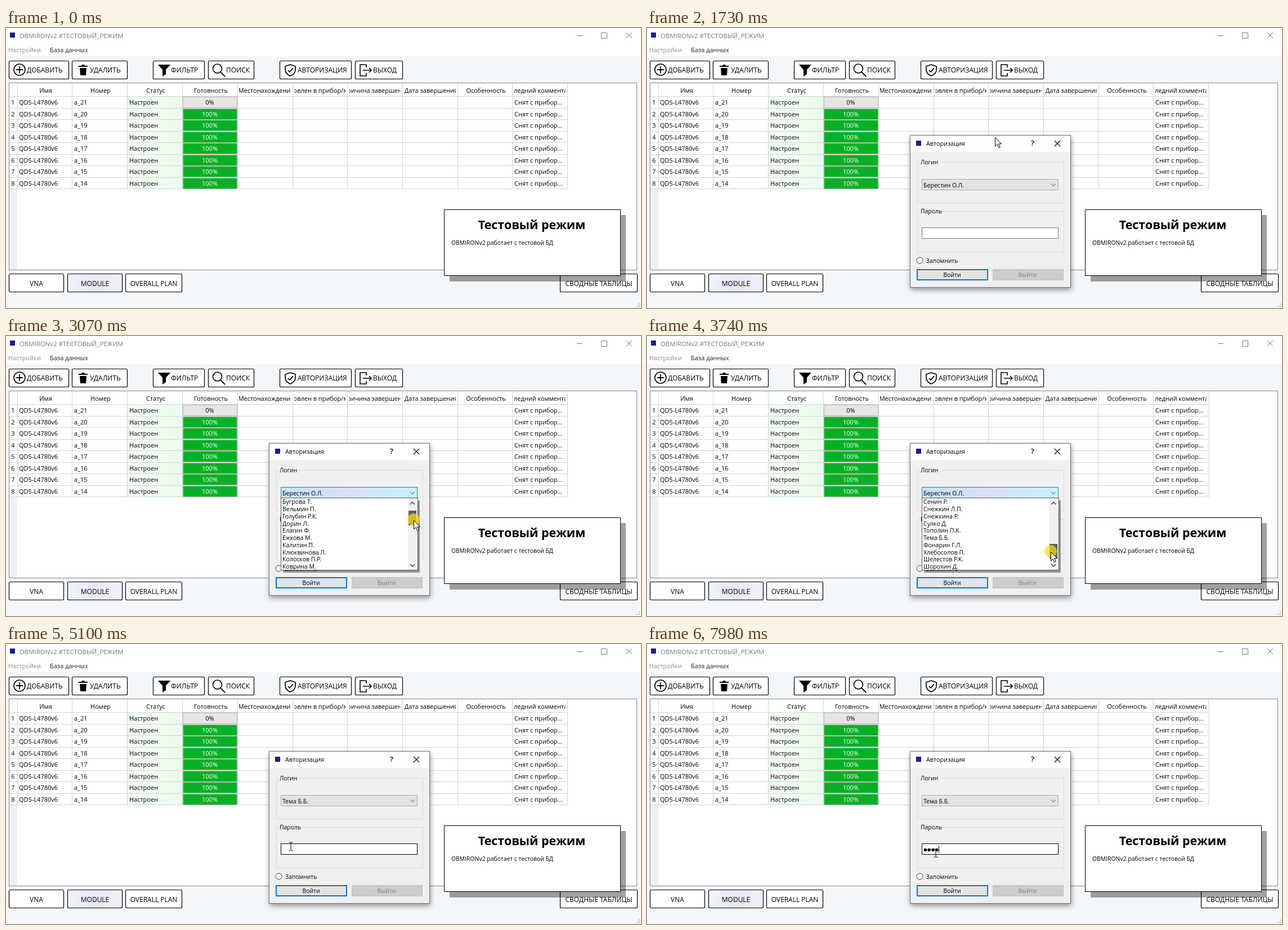
Write an HTML page that moves like this. It is 1128 px wide and 497 px high and loops after 8000 ms.

```html
<!DOCTYPE html>
<html lang="ru">
<meta charset="utf-8">
<style>
  html, body { margin: 0; width: 100%; height: 100%; overflow: hidden; background: #fff }
  svg { display: block }
  text { font-family: "Open Sans", "Noto Sans", sans-serif; white-space: pre }
</style>
<body>
<script>
const APP = 'OBMIRONv2', ROW = 12.75, LOOP = 8000;
const USERS = ['Алтынин К.', 'Берестин О.Л.', 'Бугрова Т.', 'Вельмин П.', 'Голубин Р.К.', 'Дорин Л.',
  'Елагин Ф.', 'Ежкова М.', 'Калитин П.', 'Клюквинова Л.', 'Колосков П.Р.', 'Коврина М.', 'Кротин В.',
  'Лугова Д.', 'Лядин К.', 'Мохов Р.', 'Мельнин Т.', 'Нивин О.', 'Орешин П.', 'Осокина Л.', 'Пенкин Ф.',
  'Ручьин Г.', 'Рябова К.', 'Садин М.', 'Светин Р.', 'Северин Л.', 'Сенин Р.', 'Снежкин Л.П.',
  'Снежкина Р.', 'Сулко Д.', 'Тополин П.К.', 'Тема Б.Б.', 'Фонарин Г.Л.', 'Хлебосолов П.',
  'Шелестов Р.К.', 'Шорохин Д.'];
const FIRST_USER = 1, PICKED_USER = 31;

// Markup helpers; strokes sit on half pixels.
const rect = (x, y, w, h, fill, stroke, extra = '') =>
  `<rect x="${x}" y="${y}" width="${w}" height="${h}" fill="${fill}" ${stroke ? `stroke="${stroke}"` : ''} ${extra}/>`;
const text = (x, y, s, size = 11, fill = '#000', extra = '') =>
  `<text x="${x}" y="${y}" font-size="${size}" fill="${fill}" ${extra}>${s}</text>`;
const mid = (x, y, s, size, fill, extra = '') => text(x, y, s, size, fill, 'text-anchor="middle" ' + extra);
const path = (d, stroke = '#000', width = 1, fill = 'none', extra = '') =>
  `<path d="${d}" fill="${fill}" stroke="${stroke}" stroke-width="${width}" ${extra}/>`;
const circle = (x, y, r, fill, stroke = 'none', width = 1) =>
  `<circle cx="${x}" cy="${y}" r="${r}" fill="${fill}" stroke="${stroke}" stroke-width="${width}"/>`;
const group = (id, body) => `<g id="${id}">${body}</g>`;
const clip = (x, y, w, h, body) => `<svg x="${x}" y="${y}" width="${w}" height="${h}">${body}</svg>`;
const gradient = (id, ...colors) => `<linearGradient id="${id}">` +
  colors.map((c, i) => `<stop offset="${i / (colors.length - 1)}" stop-color="${c}"/>`).join('') + '</linearGradient>';
const button = (x, y, w, fill = '#fff', extra = '') =>
  rect(x + .5, y + .5, w, 32, fill, '#000', 'rx="2" stroke-width="1.2" ' + extra);

function titleBar() {
  return rect(0, 0, 1128, 50, '#fff') + rect(7, 8, 9, 9, '#1d1d8f') +
    group('caption', text(24, 18, APP + ' #ТЕСТОВЫЙ_РЕЖИМ', 11.4, 'inherit') +
      path('M1014 13.5h10M1057.5 8.5h10v10h-10zM1102 8l10 10m0-10l-10 10', 'currentColor')) +
    text(4, 43, 'Настройки', 11, '#8c8c8c') + text(78, 43, 'База данных', 11, '#222');
}

function toolbar() {
  const items = [[5, 106, 37, 'ДОБАВИТЬ'], [117, 98, 149, 'УДАЛИТЬ'], [261, 91, 293, 'ФИЛЬТР'],
    [359, 81, 391, 'ПОИСК'], [486, 127, 518, 'АВТОРИЗАЦИЯ'], [620, 84, 652, 'ВЫХОД']];
  return items.map(([x, w, tx, s], i) =>
      button(x, 58, w, '#fff', i === 4 ? 'id="auth"' : '') + text(tx, 79, s, 12)).join('') +
    circle(24, 74, 10, 'none', '#000', 1.6) + path('M24 68v12M18 74h12', '#000', 1.8) +
    path('M129 67h5l1-2h4l1 2h5v2h-16zM131 71h12l-1 13h-10z', 'none', 0, '#000') +
    path('M270 65h22l-8 9v8l-6 4v-12z', 'none', 0, '#000') +
    circle(375.5, 72, 8, 'none', '#000', 1.6) + path('M381 78l8 8', '#000', 1.8) +
    path('M505 65l9 3v6c0 6-4 9-9 11c-5-2-9-5-9-11v-6zM501 75l3 3 6-7', '#000', 1.7) +
    path('M640 70v-5h-11v20h11v-5M634 75h15m-4-4l4 4-4 4', '#000', 1.6);
}

function table() {
  const edges = [20, 117, 215, 313, 411, 509, 606, 704, 802, 899, 997];
  const heads = ['Имя', 'Номер', 'Статус', 'Готовность', 'Местонахождение', 'Установлен в прибор/модуль',
    'Причина завершения', 'Дата завершения', 'Особенность', 'Последний комментарий'];
  let out = rect(5.5, 97.5, 1115, 332, '#fff', '#828790') + rect(6, 286, 14, 143, '#eff0f1');
  heads.forEach((s, i) => {
    const w = edges[i + 1] - edges[i];
    out += clip(edges[i] + 3, 99, w - 6, 22, mid(w / 2 - 1, 15.5, s));
  });
  out += rect(216, 122, 97, 163, 'url(#status)');
  for (let i = 0; i <= 8; i++) {
    const y = Math.floor(121.5 + 20.5 * i) + .5;
    out += path(`M6 ${y}h991`, '#d2d2d2') + path(`M216 ${y}h97`, '#bce5be');
  }
  edges.forEach((x, i) => out += path(`M${x + .5} 98v188`, i === 2 ? '#b4e3b7' : '#d2d2d2'));
  for (let i = 0; i < 8; i++) {
    const y = Math.round(132 + 20.55 * i), base = y + 4;
    out += mid(12.5, base, i + 1) + text(23, base, 'QD5-L4780v6') + text(121, base, 'a_' + (21 - i)) +
      text(219, base, 'Настроен') + text(903, base, 'Снят с прибор...') +
      rect(314.5, y - 9.5, 96, 19, i ? '#06b025' : '#e6e6e6', '#bcbcbc') +
      mid(362, base, i ? '100%' : '0%', 11, i ? '#fff' : '#000');
  }
  return out;
}

function footer() {
  return [[5, 97, 'VNA'], [109, 97, 'MODULE'], [212, 100, 'OVERALL PLAN'], [984, 137, 'СВОДНЫЕ ТАБЛИЦЫ']]
      .map(([x, w, s], i) => button(x, 436, w, i === 1 ? 'url(#module)' : '#fff') + mid(x + w / 2 + .5, 457.5, s, 12)).join('') +
    path('M1124 490h2M1120 494h2M1124 494h2', '#b0b0b0', 2) +
    rect(788, 332, 313, 118, '#000', '', 'opacity=".37"') +
    rect(778.5, 322.5, 313, 117, '#fff', '#000') +
    mid(934, 357, 'Тестовый режим', 21.4, '#000', 'font-weight="700"') +
    text(791, 385, APP + ' работает с тестовой БД', 10.4);
}

function dialog() {
  const frame = (y, s) => rect(480.5, y + .5, 260, 72, 'none', '#dadada') +
    rect(484, y - 3, 6 + s.length * 6, 8, '#f0f0f0') + text(486, y + 4, s, 10.4);
  return rect(467.5, 190.5, 285, 270, '#f0f0f0', '#6e6e6e', 'filter="url(#shadow)"') +
    rect(468, 191, 284, 29, '#fff') + rect(478, 200, 9, 9, '#1d1d8f') +
    text(496, 209, 'Авторизация', 10.8) + mid(685, 209, '?', 13, '#000', 'font-weight="600"') +
    path('M724 200l10 10m0-10l-10 10', '#000', 1.1) +
    frame(238, 'Логин') + frame(325, 'Пароль') +
    rect(488.5, 268.5, 242, 19, '#e3e3e3', '#adadad', 'id="combo"') +
    text(491, 283, '', 10.6, '#000', 'id="login"') + path('M718 276.5l4 4 4-4', '#444') +
    rect(488.5, 354.5, 242, 19, '#fff', '#7a7a7a', 'id="field"') + group('dots', '') +
    path('M0 358v13', '#000', 1, 'none', 'id="caret"') +
    circle(484.5, 412.5, 5.5, '#fff', '#333') + text(496, 416.5, 'Запомнить', 10.4) +
    rect(480, 429, 125, 18, '#e3e3e3', '#0078d7', 'stroke-width="2"') + mid(542, 442, 'Войти', 10.4) +
    rect(614.5, 428.5, 125, 19, '#cccccc', '#bfbfbf') + mid(676, 442, 'Выйти', 10.4, '#838383');
}

function dropdown() {
  return rect(492, 292, 243, 128, '#000', '', 'opacity=".38"') +
    rect(488.5, 287.5, 243, 128, '#fff', '#555') +
    rect(714, 288, 17, 127, '#f0f0f0') +
    path('M718 299l4-4 4 4M718 405l4 4 4-4', '#505050', 1.6) +
    rect(715, 305, 14, 26, '#cdcdcd', '', 'id="thumb"') +
    clip(489, 288, 225, 127, group('items',
      rect(.5, .5, 223, 11.75, '#0078d7', '#e08a28', 'id="mark" stroke-dasharray="1 1"') +
      USERS.map((s, i) => text(2, 10.4 + i * ROW, s, 10.6, '#000', 'class="user"')).join('')));
}

document.body.innerHTML = `<svg width="1128" height="497" viewBox="0 0 1128 497"><defs>` +
  gradient('status', '#f5fdf5', '#ebfaed') + gradient('module', '#eef3fb', '#e9e8fa', '#f1f1fa') +
  gradient('hot', '#c5e4fa', '#dbe0f9', '#c4f4fb') +
  `<filter id="shadow" x="-10%" y="-10%" width="120%" height="125%">
    <feDropShadow dx="1" dy="4" stdDeviation="5" flood-opacity=".4"/></filter></defs>` +
  rect(0, 50, 1128, 447, '#f3f7fa') + titleBar() + toolbar() + table() + footer() +
  group('dialog', dialog() + group('list', dropdown())) +
  `<circle id="press" r="11" fill="#f7df10" opacity=".72"/>` +
  path('M.5 .5v15.5l3.6-3.4 2.6 6 2.5-1.1-2.6-5.8h5.1z', '#000', 1, '#fff', 'id="arrow"') +
  path('M-3.5 -7h2.5l1 1 1-1h2.5M0 -6v13M-3.5 7.5h2.5l1-1 1 1h2.5', '#000', 1, 'none', 'id="beam"') + '</svg>';

const el = id => document.getElementById(id);
const set = (id, attrs) => { for (const k in attrs) el(id).setAttribute(k, attrs[k]); };
const show = (id, on) => el(id).style.display = on ? '' : 'none';
const names = [...document.querySelectorAll('.user')];

// Pointer path: time, x, y.
const PATH = [[280, 1024, 484], [472, 905, 350], [664, 650, 150], [856, 554, 86], [1050, 558, 87],
  [1430, 560, 90], [1722, 618, 194], [1915, 712, 270], [2010, 719, 277], [2400, 720, 279], [2780, 724, 322],
  [2890, 724, 322], [3067, 724, 327], [3640, 718, 380], [3740, 717, 383], [3930, 717, 383],
  [4130, 680, 384], [4508, 504, 351], [4605, 505, 356], [4990, 505, 357], [5200, 508, 362], [5570, 513, 371]];
const PRESSES = [[1140, 1235], [2300, 2395], [2880, 3930], [4890, 4980], [6040, 6140]];
const KEYS = [7030, 7320, 7600, 7980];

function pointer(t) {
  const i = PATH.findIndex(p => p[0] > t);
  if (i < 0) return PATH.at(-1).slice(1);
  if (i === 0) return PATH[0].slice(1);
  const [t0, x0, y0] = PATH[i - 1], [t1, x1, y1] = PATH[i], f = (t - t0) / (t1 - t0);
  return [Math.round(x0 + (x1 - x0) * f), Math.round(y0 + (y1 - y0) * f)];
}

function draw(t) {
  const step = 280 + 96.1 * Math.floor((t - 280) / 96.1);
  const during = (a, b) => step >= a && step < b;
  const [x, y] = pointer(step);
  const visible = t >= 290, pressed = PRESSES.some(p => during(...p));
  const open = during(2310, 4980), dialogOpen = step >= 1330;
  const overField = dialogOpen && !open && x > 488 && x < 731 && y > 354 && y < 374;

  el('caption').style.cssText = during(1140, 1330) ? 'color:#000;fill:#000' : 'color:#777;fill:#777';
  const overAuth = visible && !dialogOpen && x > 486 && x < 614 && y > 58 && y < 91;
  set('auth', { fill: overAuth ? 'url(#hot)' : '#fff' });

  show('dialog', dialogOpen);
  const overCombo = open || (dialogOpen && x > 488 && x < 731 && y > 268 && y < 288);
  set('combo', { fill: overCombo ? 'url(#hot)' : '#e3e3e3', stroke: overCombo ? '#3b78a8' : '#adadad' });
  el('login').textContent = USERS[step < 4980 ? FIRST_USER : PICKED_USER];

  show('list', open);
  const dragY = step < 2880 ? 322 : pointer(Math.min(step, 3740))[1];
  const thumbY = Math.min(369, 305 + (dragY - 322) * 1.06);
  const first = Math.round((thumbY - 305) / 64 * 26);
  const marked = step < 3930 ? FIRST_USER : first + Math.floor((y - 288) / ROW);
  set('thumb', { y: Math.round(thumbY), fill: during(2880, 3930) ? '#606060' : '#cdcdcd' });
  set('items', { transform: `translate(0 ${-first * ROW})` });
  set('mark', { y: marked * ROW + .5 });
  names.forEach((n, i) => n.setAttribute('fill', i === marked ? '#fff' : '#000'));

  const typed = KEYS.filter(k => t >= k).length;
  set('field', { stroke: overField ? '#000' : '#7a7a7a' });
  el('dots').innerHTML = KEYS.slice(0, typed).map((_, i) => circle(494.5 + 6.7 * i, 365.5, 2.8, '#000')).join('');
  show('caret', during(6040, 6140) || t >= 6640);
  set('caret', { transform: `translate(${491.5 + Math.round(6.7 * typed)} 0)` });

  show('press', pressed);
  set('press', { cx: x, cy: y - 1 });
  show('arrow', visible && !overField);
  show('beam', overField);
  for (const id of ['arrow', 'beam']) set(id, { transform: `translate(${x} ${y})` });
}

function tick() {
  draw(performance.now() % LOOP);
  requestAnimationFrame(tick);
}
tick();
</script>
</body>
</html>
```
